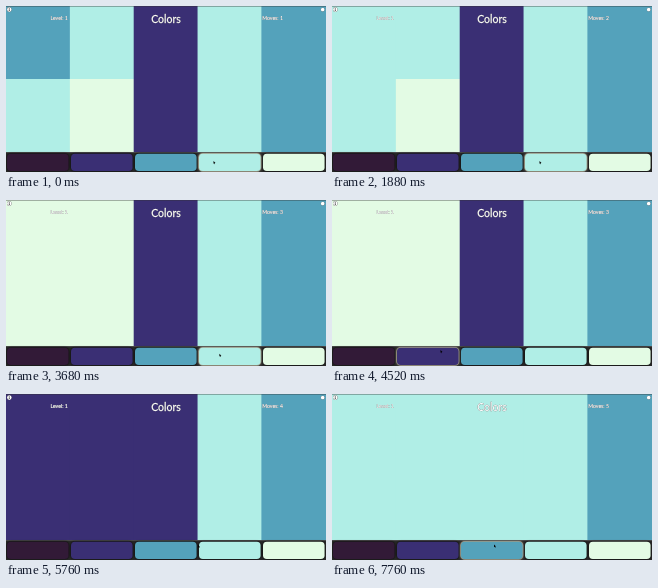
These frames come from a looping animation (320x166 px, 7.92 s). An HTML page:

```html
<!DOCTYPE html>
<html lang="en">
<head>
<meta charset="utf-8">
<title>Colors</title>
<style>
  html, body { margin: 0; width: 100%; height: 100%; overflow: hidden; background: #262626; }
  svg { display: block; width: 100vw; height: 100vh; }
  text { font-family: Lato, "Open Sans", sans-serif; fill: #fff; stroke: #fff; text-anchor: middle; }
  .label { font-size: 5.2px; stroke-width: .22px; filter: drop-shadow(.3px .3px .4px #000b); }
  .title { font-size: 10.5px; stroke-width: .3px; filter: drop-shadow(.4px .5px .4px #000c); }
  .icon { filter: drop-shadow(0 0 .5px #000); }
  .button { filter: drop-shadow(0 0 1px #000); }
  .button.hover { stroke: #aca58f; stroke-opacity: .8; stroke-width: 1.6px; paint-order: stroke; filter: drop-shadow(0 0 .8px #bdb7a099); }
</style>
</head>
<body>
<svg viewBox="0 0 320 166" preserveAspectRatio="none">
  <g id="board"></g>
  <rect width="320" height=".7" fill="#333" opacity=".55"/>
  <rect y="146" width="320" height="20" fill="#292929"/>
  <rect y="146" width="320" height="1" fill="#484848"/>
  <g id="palette"></g>
  <text class="label" x="53.1" y="13.6">Level: 1</text>
  <text class="title" x="160" y="16.6">Colors</text>
  <text class="label" id="moves" x="266.6" y="13.6"></text>
  <g class="icon">
    <circle cx="3.3" cy="3.6" r="2.3" fill="#fff"/>
    <path d="M3.3 2.1v.7M3.3 3.3v1.8" stroke="#222" stroke-width=".8"/>
    <circle cx="316.7" cy="3.6" r="1.9" fill="#fff"/>
  </g>
  <path id="cursor" d="M0 0V2.8L.7 2.2 1.2 3.2 1.6 3 1.2 2H2Z" fill="#000"/>
</svg>
<script>
const DURATION = 7920;
const COLORS = ['#321a37', '#3a2f74', '#54a2bb', '#b0eee6', '#e3fbe4'];
const COLUMN = 63.85;
const ROW = 73;
const BUTTON = { step: 64, x: 1, y: 147.8, width: 61.6, height: 17.2, rx: 3.8 };
const MS_PER_PIXEL = 6;

// The pointer rests on a button, clicks it, then leaves for the next one.
const STOPS = [
  { x: 207.5, y: 155, click: 1200, leave: 2040 },
  { x: 265, y: 155.5, click: 2720, leave: 3320 },
  { x: 108.5, y: 150, click: 4680, leave: 5315 },
  { x: 212, y: 151, click: 6040, leave: 6560 },
  { x: 162, y: 150.5, click: Infinity, leave: Infinity }
];

const byId = id => document.getElementById(id);
const smooth = p => p * p * (3 - 2 * p);
const mix = (a, b, p) => a + (b - a) * p;

function addRect(parent, attributes) {
  const rect = document.createElementNS('http://www.w3.org/2000/svg', 'rect');
  for (const name in attributes) rect.setAttribute(name, attributes[name]);
  return parent.appendChild(rect);
}

function buttonAt(x) {
  const index = Math.floor(x / BUTTON.step);
  const offset = x - index * BUTTON.step - BUTTON.x;
  return offset > 0 && offset < BUTTON.width ? index : -1;
}

function flood(board, color) {
  const next = board.map(row => [...row]);
  const old = next[0][0];
  const visit = (row, col) => {
    if (next[row]?.[col] !== old || old === color) return;
    next[row][col] = color;
    visit(row + 1, col);
    visit(row - 1, col);
    visit(row, col + 1);
    visit(row, col - 1);
  };
  visit(0, 0);
  return next;
}

function pointerAt(time) {
  const index = STOPS.findLastIndex(stop => time >= stop.leave);
  if (index < 0) return STOPS[0];
  const from = STOPS[index], to = STOPS[index + 1];
  const travel = Math.abs(to.x - from.x) * MS_PER_PIXEL;
  const p = smooth(Math.min(1, (time - from.leave) / travel));
  return { x: mix(from.x, to.x, p), y: mix(from.y, to.y, p) };
}

const start = ['23132', '34132'].map(row => [...row].map(Number));
const boards = [start];
for (const stop of STOPS) boards.push(flood(boards.at(-1), buttonAt(stop.x)));

// Each cell reaches the right edge so that its neighbour overlaps it without a seam.
const cells = start.map((row, r) => row.map((_, c) => addRect(byId('board'),
  { x: c * COLUMN, y: r * ROW, width: 320 - c * COLUMN, height: ROW })));
const { step, ...shape } = BUTTON;
const buttons = COLORS.map((fill, i) => addRect(byId('palette'),
  { ...shape, x: i * step + shape.x, fill, class: 'button' }));

function render(time) {
  const turn = STOPS.filter(stop => time >= stop.click).length;
  cells.forEach((row, r) => row.forEach((cell, c) =>
    cell.setAttribute('fill', COLORS[boards[turn][r][c]])));
  byId('moves').textContent = `Moves: ${turn + 1}`;

  const { x, y } = pointerAt(time);
  byId('cursor').setAttribute('transform', `translate(${x} ${y})`);
  const hovered = buttonAt(x);
  buttons.forEach((button, i) => button.classList.toggle('hover', i === hovered));
}

const origin = performance.now();
function tick() {
  render((performance.now() - origin) % DURATION);
  requestAnimationFrame(tick);
}
tick();
</script>
</body>
</html>
```
